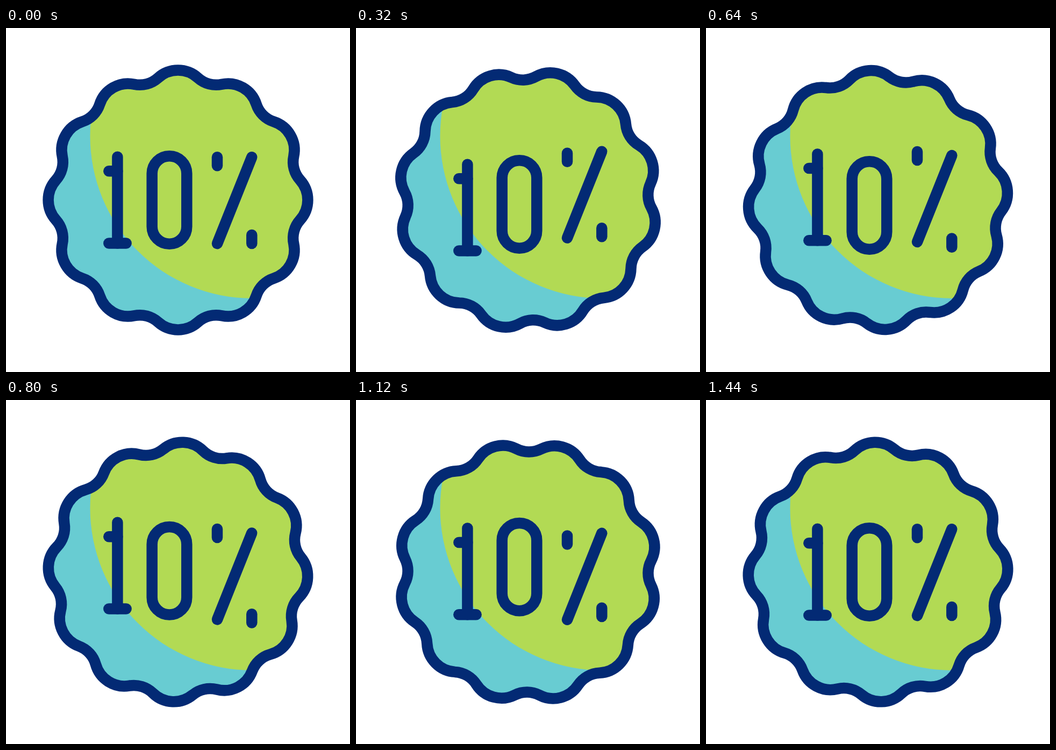
These frames come from a looping animation (640 by 640 pixels, 1.48 s). An HTML page with a canvas:

```html
<!DOCTYPE html>
<html lang="en">
<head>
<meta charset="utf-8">
<title>Discount badge</title>
<style>
  html, body { margin: 0; width: 100%; height: 100%; overflow: hidden; background: #fff; }
  canvas { display: block; }
</style>
</head>
<body>
<canvas id="stage" width="640" height="640"></canvas>
<script>
const ctx = document.getElementById('stage').getContext('2d');
const NAVY = '#032a74', GREEN = '#b2da54', TEAL = '#68ccd2';
const STEP = 40, STEPS = 37, LEAD = 8;
const LOBES = 12;
const LOBE = { dist: 186, r: 55.4 };
const DIP = { dist: 274, r: 50.5 };

// Each part sways to one side, then the other, then rests: [step, offset].
const SWAY = {
  one:    [[0, 0], [8, 14], [20, -12], [30, 0]],
  zero:   [[2, 0], [13, 14], [25, -12], [35, 0]],
  slash:  [[0, 0], [10.5, -12.3], [23.5, 11.5], [35, 0]],
  topDot: [[2, 0], [13, -13.2], [27, 12.8], [36, 0]],
  lowDot: [[0, 0], [8, -12.7], [20, 13.4], [30.5, 0]]
};

const smooth = p => p * p * (3 - 2 * p);

function sway(keys, step) {
  for (let i = 1; i < keys.length; i++) {
    const [s0, v0] = keys[i - 1], [s1, v1] = keys[i];
    if (step <= s1) {
      const p = Math.max(0, (step - s0) / (s1 - s0));
      return v0 + (v1 - v0) * smooth(p);
    }
  }
  return 0;
}

function badgePath(turn) {
  const path = new Path2D(), pitch = 2 * Math.PI / LOBES, half = pitch / 2;
  const join = Math.atan2(DIP.dist * Math.sin(half), DIP.dist * Math.cos(half) - LOBE.dist);
  const arc = (c, at, from, to, ccw) =>
    path.arc(320 + c.dist * Math.cos(at), 320 + c.dist * Math.sin(at), c.r, from, to, ccw);
  for (let i = 0; i < LOBES; i++) {
    const a = turn + i * pitch;
    arc(LOBE, a, a - join, a + join, false);
    arc(DIP, a + half, a + join + Math.PI, a + pitch - join + Math.PI, true);
  }
  path.closePath();
  return path;
}

function drawBadge(turn) {
  const badge = badgePath(turn);
  ctx.fillStyle = TEAL;
  ctx.fill(badge);
  ctx.save();
  ctx.clip(badge);
  ctx.fillStyle = GREEN;
  ctx.beginPath();
  ctx.arc(458.3, 201.2, 301.8, 0, 2 * Math.PI);
  ctx.fill();
  ctx.restore();
  ctx.stroke(badge);
}

function line(x0, y0, x1, y1) {
  ctx.beginPath();
  ctx.moveTo(x0, y0);
  ctx.lineTo(x1, y1);
  ctx.stroke();
}

const PARTS = {
  one() {
    line(207.4, 239.7, 207.4, 400.4);
    line(191.3, 266.3, 207.4, 266.3);
    line(191.3, 400.4, 223.6, 400.4);
  },
  zero() {
    ctx.beginPath();
    ctx.arc(304, 270.6, 32.3, Math.PI, 0);
    ctx.arc(304, 369.4, 32.3, 0, Math.PI);
    ctx.closePath();
    ctx.stroke();
  },
  slash() { line(457.3, 240.2, 393, 401.1); },
  topDot() { line(393, 240.2, 393, 256.2); },
  lowDot() { line(457.3, 384.9, 457.3, 401); }
};

function draw(step) {
  ctx.fillStyle = '#fff';
  ctx.fillRect(0, 0, 640, 640);
  ctx.strokeStyle = NAVY;
  ctx.lineWidth = 20.5;
  ctx.lineCap = ctx.lineJoin = 'round';
  drawBadge(step / STEPS * Math.PI / 3);
  for (const name in PARTS) {
    ctx.save();
    ctx.translate(0, sway(SWAY[name], step));
    PARTS[name]();
    ctx.restore();
  }
}

const start = performance.now();
function tick(now) {
  const elapsed = Math.max(0, now - start);
  draw(Math.floor((elapsed + LEAD) / STEP) % STEPS);
  requestAnimationFrame(tick);
}
draw(0);
requestAnimationFrame(tick);
</script>
</body>
</html>
```
